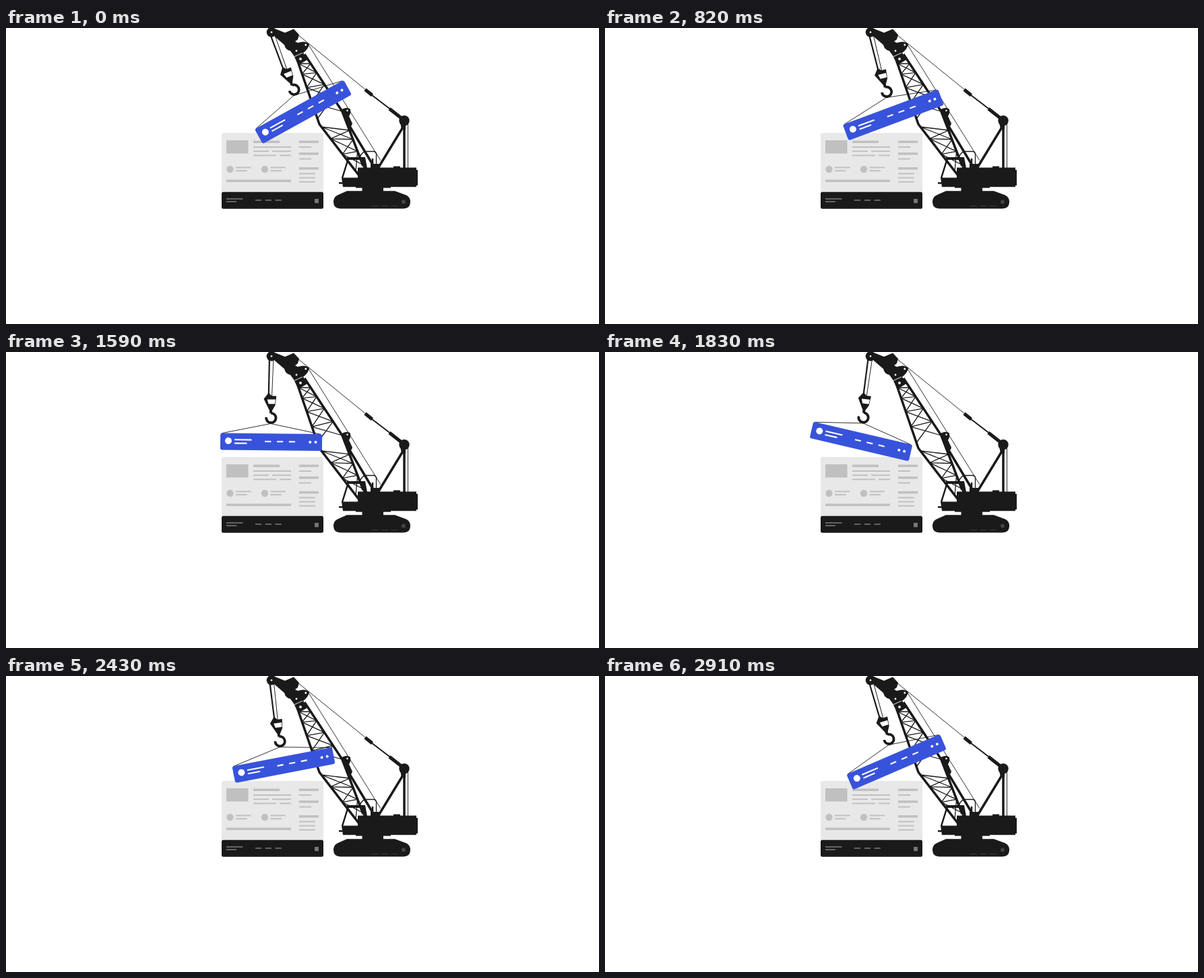
An HTML page that plays this animation: 880x440 px, repeating every 3.03 s.

```html
<!DOCTYPE html>
<html lang="en">
<head>
<meta charset="utf-8">
<title>Crane placing a page header</title>
<style>
  html, body { margin: 0; width: 100%; height: 100%; overflow: hidden; background: #fff; }
  svg { display: block; width: 880px; height: 440px; }
  .ink { fill: #1a1a1a; }
  .line { fill: none; stroke: #1a1a1a; }
  .thin { stroke-width: .9; }
  .mid { stroke-width: 1.3; }
  .chord { stroke-width: 3.5; }
  .white { fill: #fff; }
</style>
</head>
<body>
<svg viewBox="0 0 880 440">
  <!-- page -->
  <rect x="320" y="156" width="151" height="92" rx="3" fill="#e8e8e8"/>
  <rect class="ink" x="320" y="243.7" width="151" height="25" rx="2.5"/>
  <g id="blocks" fill="#c0c0c0"></g>
  <g id="footer" fill="#777"></g>

  <!-- ropes and mast -->
  <path class="line thin" d="M433 10L534 92M449 25L556 197M596.5 140V208"/>
  <path class="line" stroke-width="2" d="M542 99L572 122"/>
  <path class="line" stroke-width="5" d="M533 91.5l10.500 8.500M569 120l19 15"/>
  <path class="line chord" d="M591 138V208M590 146L553.500 206"/>
  <path class="ink" d="M585 140h8v11h-6z"/>
  <circle class="ink" cx="591" cy="137.8" r="7.7"/>

  <!-- boom -->
  <path class="line chord" d="M430 41L465 143L526 222M443 39L499 124L530 205M510 146L546 206"/>
  <path class="line mid" id="lattice"/>
  <path class="ink" d="M497 122Q506 116 511 121Q512 127 509 131L514 142Q513 147 509 147L503 138z"/>
  <path class="ink" d="M394 -1L414 7L427 1.500L435 10L433 17L429 20L433 22Q445 18 450 24Q449 31 441 37L447.500 47L434 55L427 41L422 34Q415 33 413 25L399 13z"/>
  <path d="M428 42.5L440 37" stroke="#fff" stroke-width=".9"/>
  <circle class="ink" cx="394" cy="6.3" r="7.3"/>
  <g class="white">
    <circle cx="394" cy="6.3" r="1.3"/>
    <circle cx="444.8" cy="25" r="1.5"/>
    <circle cx="431" cy="34" r="1.4"/>
    <circle cx="437" cy="46" r="1.9"/>
    <circle cx="506.5" cy="122.8" r="1.3"/>
  </g>

  <!-- cab, body, tracks -->
  <path class="line" stroke-width="2.5" d="M499 223L508 194M494 230.500h7M544 194v14"/>
  <path class="line mid" d="M525 192Q529 183.500 534 183.500H546Q549.500 184 549.500 188V204"/>
  <g class="ink">
    <path d="M506 192H533L536 208H530L528 196H506z"/>
    <path d="M498 222.500H522V207.500H609V236.300H500z"/>
    <rect x="541" y="202" width="14" height="7"/>
    <rect x="575" y="205.5" width="10" height="3"/>
    <rect x="600" y="211" width="11" height="23"/>
    <rect x="519" y="235" width="52" height="2.7"/>
    <rect x="528.5" y="236" width="31.500" height="8"/>
    <path d="M506 242.200H577L594 248.500Q600 252 600 258Q600 268.500 589 268.500H497Q486 268.500 486 258Q486 251 493 248z"/>
  </g>
  <circle cx="590" cy="258.5" r="3" fill="#444"/>
  <path d="M542 264.5h39" stroke="#3a3a3a" stroke-width="1.2" stroke-dasharray="10.500 4"/>

  <!-- hook, drawn hanging straight down -->
  <g id="hook">
    <path class="line" stroke-width="2.2" d="M391 10L390.500 63"/>
    <path class="line thin" d="M397 10L395.300 66"/>
    <path class="ink" d="M383.300 70L390.500 60.500L395 65.300H402L400.500 79L396 87V91H392V87z"/>
    <path class="white" d="M388.500 70.500H400.600L400 77.200H390.500z"/>
    <path class="line" stroke-width="3.8" d="M387.300 97A7.200 7.200 0 1 0 394 90.800"/>
  </g>
  <path class="line thin" id="sling"/>

  <!-- header bar, centred on 0,0 -->
  <g id="bar">
    <rect x="-75.5" y="-12.5" width="151" height="25" rx="3" fill="#3853db"/>
    <g class="white">
      <circle cx="-63.6" cy="-1" r="5"/>
      <circle cx="57.7" cy="-.4" r="2"/>
      <circle cx="65.9" cy="-.4" r="2"/>
    </g>
    <g stroke="#fff" stroke-width="2.1">
      <path d="M-54.500 -2.800h25.500M-54.500 2.500h18.500"/>
      <path d="M-9.500 -.6h45" stroke-dasharray="9.200 8.700"/>
    </g>
  </g>
</svg>
<script>
const $ = id => document.getElementById(id);
const add = (id, markup) => $(id).insertAdjacentHTML('beforeend', markup);
const rect = (x, y, w, h = 2, id = 'blocks') =>
  add(id, `<rect x="${x}" y="${y}" width="${w}" height="${h}"/>`);
const heading = (x, y, w) => rect(x, y, w, 3.5);

function drawPage() {
  rect(327, 167, 32.5, 19.5);
  heading(367, 167.5, 39);
  heading(327, 225.5, 96);
  // Paragraph rows, each broken by a gap that starts after `first`.
  [56, 23, 34].forEach((first, row) => {
    const y = 176 + row * 6.2, rest = 51 - first;
    rect(367, y, first);
    if (rest > 0) rect(372 + first, y, rest);
  });
  for (const x of [327, 378.5]) {
    add('blocks', `<circle cx="${x + 5.5}" cy="210" r="5.2"/>`);
    rect(x + 14, 206.4, 22.5);
    rect(x + 14, 211.2, 16.5);
  }
  for (const [y, rows] of [[167.5, 1], [185.1, 1], [207, 3]]) {
    heading(435, y, 29);
    for (let i = 0; i < rows; i++) rect(435, y + 8.5 + i * 6.1, rows > 1 ? 24 : 18);
  }
  rect(327, 253.2, 24.5, 1.6, 'footer');
  rect(327, 257.4, 15, 1.6, 'footer');
  for (let i = 0; i < 3; i++) rect(370 + i * 14.8, 255.2, 9.2, 1.6, 'footer');
  rect(458, 254, 6, 6.3, 'footer');
}

// Cross-braced bays between two chords, widening downwards.
function lattice(left, right, bays) {
  const at = ([x0, y0, x1, y1], i) => {
    const u = (i / bays) ** 1.2;
    return [x0 + (x1 - x0) * u, y0 + (y1 - y0) * u];
  };
  let d = '';
  for (let i = 0; i < bays; i++) {
    d += `M${at(left, i)}L${at(right, i)}L${at(left, i + 1)}M${at(left, i)}L${at(right, i + 1)}`;
  }
  return d;
}

drawPage();
$('lattice').setAttribute('d',
  lattice([434, 53, 462, 135], [452, 53, 499, 124], 4) +
  lattice([468, 147, 519, 213], [510, 152, 529, 203], 3));

// The picture moves in steps; the swing mirrors around its middle step.
const LOOP = 3030, MIDDLE = 11, PIVOT = [394, 6], RAD = Math.PI / 180;
const starts = [0, 520, 670, 820, 960, 1090, 1210];
for (let t = 1350; t < LOOP; t += 120) starts.push(t);

const hang = (deg, r) => [PIVOT[0] + r * Math.sin(deg * RAD), PIVOT[1] + r * Math.cos(deg * RAD)];

function draw(now) {
  const step = starts.filter(s => s <= now % LOOP).length - 1;
  const u = Math.abs(step - MIDDLE) / MIDDLE;
  const swing = -6.3 + 27.9 * u * (1.25 - .25 * u);
  const tilt = -13.2 + 42.2 * u ** .71;
  const hook = swing - .5;

  const [x, y] = hang(swing, 127.7), [hx, hy] = hang(hook, 92);
  const c = Math.cos(tilt * RAD), s = Math.sin(tilt * RAD);
  const corner = px => [x + px * c - 12.3 * s, y - px * s - 12.3 * c];
  $('hook').setAttribute('transform', `rotate(${-hook} ${PIVOT})`);
  $('bar').setAttribute('transform', `translate(${x} ${y}) rotate(${-tilt})`);
  $('sling').setAttribute('d', `M${corner(-73)}L${hx} ${hy + 8.5}L${corner(73)}`);
}

const begin = performance.now();
(function tick() {
  draw(performance.now() - begin);
  requestAnimationFrame(tick);
})();
</script>
</body>
</html>
```
